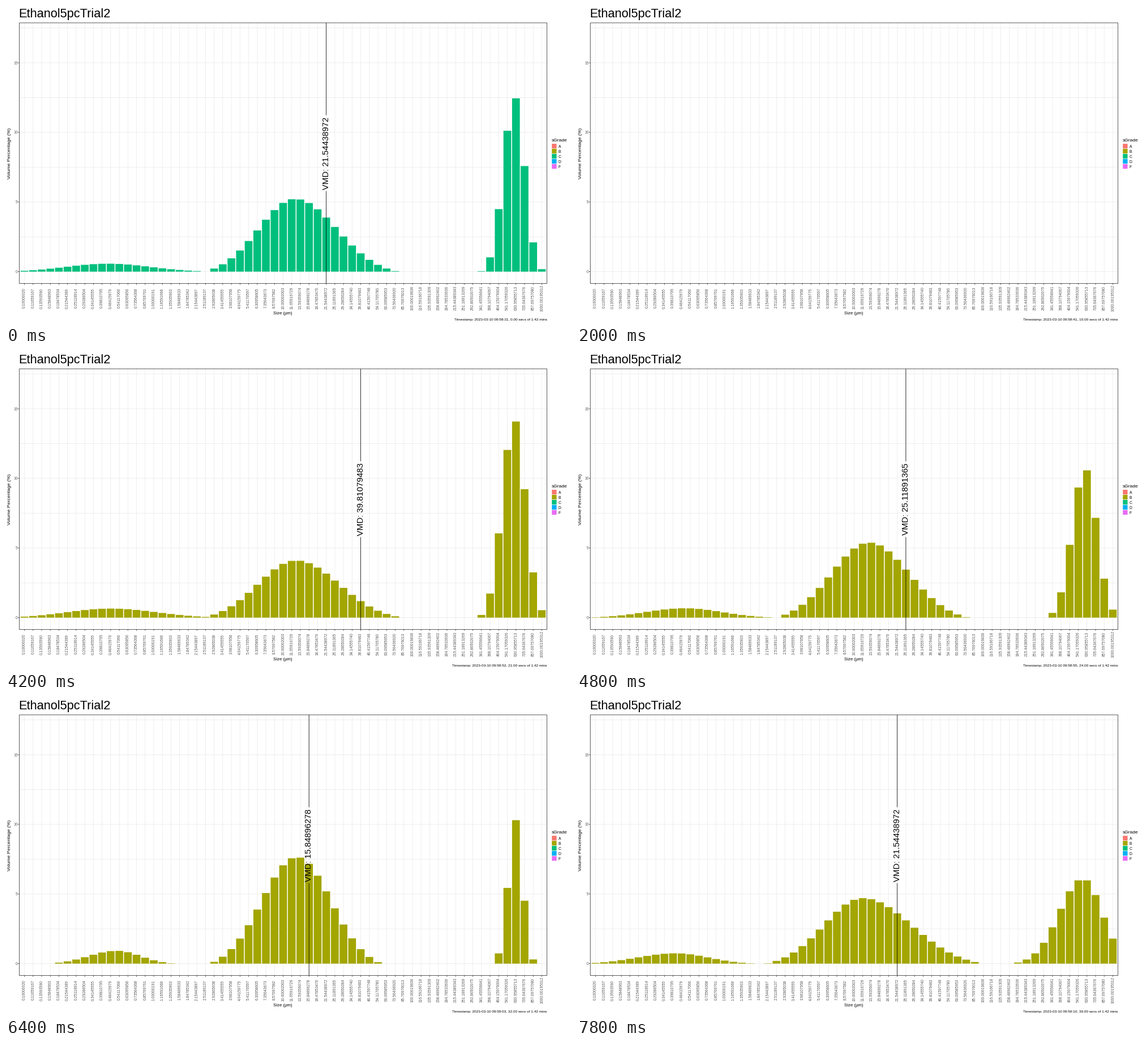
Write a matplotlib script that moves like this. It is 998x561 px and loops after 8000 ms.

```python
import numpy as np
import matplotlib.pyplot as plt
from matplotlib.animation import FuncAnimation
from matplotlib.patches import Rectangle

W, H, DPI = 998, 561, 100
FRAMES, INTERVAL = 40, 200
LEFT, RIGHT, TOP, BOTTOM = 23.4, 955.6, 29.8, 489.5
MID_Y = (TOP + BOTTOM) / 2
ZERO, UNIT = 468.6, 24.57
BINS = 61
STEP = (RIGHT - LEFT) / (BINS + 0.2)
BAR_W = 0.9 * STEP
THIN = 0.8
GRADES = {"A": "#F8766D", "B": "#A3A500", "C": "#00BF7D",
          "D": "#00B0F6", "F": "#E76BF3"}
EMPTY = range(9, 12)

plt.rcParams["font.family"] = "Liberation Sans"

# Second -> median bin, then a skewed bell for the fine, medium and coarse
# droplets: (peak, centre bin, left width, right width)
KEYS = {
    0: (35, (.57, 9.7, 7.0, 7.0), (5.22, 31.4, 6.03, 6.8), (12.55, 56.85, 1.84, 1.63)),
    5: (52, (.49, 10.3, 8.0, 7.0), (4.45, 31.2, 6.0, 5.9), (13.1, 56.9, 2.41, 1.95)),
    21: (39, (.65, 10, 7.3, 7.6), (4.1, 31.5, 6.25, 7.05), (14.25, 56.8, 1.96, 1.83)),
    28: (33, (.7, 10.9, 5.5, 4.25), (7.1, 32.05, 6.13, 5.95), (6.0, 56.75, 2.32, 2.08)),
    32: (33, (.92, 10.7, 4.6, 3.9), (7.65, 31.6, 5.78, 5.62), (10.3, 57, 1.26, 1.11)),
    39: (35, (.74, 9.3, 6.3, 5.4), (4.7, 31, 6.4, 8.0), (6.1, 56.55, 3.88, 3.15)),
}
TIMES = list(KEYS)
PARAMS = np.array([np.hstack(k) for k in KEYS.values()])
CUTS = (0.05, 0.05, 0.01)


def bin_x(i):
    return LEFT + (i + 0.6) * STEP


def value_y(v):
    return ZERO - v * UNIT


def bin_label(i):
    return f"{np.float32(0.100000196 * 10 ** (i / 15)):.8f}"


def bell(peak, centre, left, right, cut):
    """Skewed Gaussian over the bins, lowered so that its tails end."""
    d = np.arange(BINS) - centre
    g = np.exp(-(d / np.where(d < 0, left, right)) ** 2)
    return peak * ((1 + cut) * g - cut)


def sample(frame):
    """Median bin and bar heights at a given second."""
    p = [np.interp(frame, TIMES, column) for column in PARAMS.T]
    modes = [bell(*p[1 + 4 * k:5 + 4 * k], cut) for k, cut in enumerate(CUTS)]
    h = np.max(modes, axis=0)
    return int(round(p[0])), np.where(h > 0.02, h, 0)


fig = plt.figure(figsize=(W / DPI, H / DPI), dpi=DPI, facecolor="white")
ax = fig.add_axes([0, 0, 1, 1])
ax.set_xlim(0, W)
ax.set_ylim(H, 0)
ax.axis("off")


def px(size):
    return size * 72 / DPI


def text(x, y, s, size, color="black", ha="center", va="center", **kw):
    return ax.text(x, y, s, fontsize=px(size), color=color, ha=ha, va=va, **kw)


def line(xs, ys, color, z=1):
    return ax.plot(xs, ys, color=color, lw=px(THIN), zorder=z, snap=False,
                   solid_capstyle="butt")[0]


def box(x, y, w, h, color, z=3):
    return ax.add_patch(Rectangle((x, y), w, h, fc=color, lw=0, zorder=z, snap=False))


def draw_panel():
    for v in np.arange(0, 17.6, 2.5):
        y = value_y(v)
        line([LEFT, RIGHT], [y, y], "#EBEBEB")
        if v % 5 == 0:
            line([LEFT - 2.3, LEFT], [y, y], "#333333")
            text(LEFT - 2.6, y, f"{v:.0f}", 6.8, "#5A5A5A", ha="right",
                 va="center_baseline")
    for i in range(BINS):
        x = bin_x(i)
        line([x, x], [TOP, BOTTOM], "#EBEBEB")
        line([x, x], [BOTTOM, BOTTOM + 2.3], "#333333")
        text(x, 515.5, bin_label(i), 6.8, "#5A5A5A", rotation=90)
    ax.add_patch(Rectangle((LEFT, TOP), RIGHT - LEFT, BOTTOM - TOP, fill=False,
                           ec="#333333", lw=px(THIN), zorder=6, snap=False))
    text(LEFT - 0.8, 19.5, "Ethanol5pcTrial2", 21.8, ha="left", va="baseline")
    text(6.5, MID_Y, "Volume Percentage (%)", 8.5, rotation=90)
    text(489, 543, "Size (µm)", 7.8)


def draw_legend():
    text(964, 237.3, "sGrade", 8.5, ha="left")
    for k, (name, color) in enumerate(GRADES.items()):
        y = 247.2 + 8.95 * k
        box(964.2, y - 4.1, 8.3, 8.2, color)
        text(976, y + 0.2, name, 6.8, ha="left", va="center_baseline")


draw_panel()
draw_legend()
bars = [box(bin_x(i) - BAR_W / 2, ZERO, BAR_W, 0, "white") for i in range(BINS)]
marks = [line([], [], "black", 4) for _ in range(2)]
label = text(0, MID_Y, "", 14.86, rotation=90, zorder=5)
caption = text(RIGHT, 554, "", 6.5, ha="right")


def draw(frame):
    shown = frame not in EMPTY
    color = GRADES["C" if frame < 10 else "B"]
    median, heights = sample(frame)
    for bar, h in zip(bars, heights):
        bar.set_y(value_y(h))
        bar.set_height(h * UNIT)
        bar.set_facecolor(color)
        bar.set_visible(shown and h > 0)

    x, vmd = bin_x(median), f"VMD: {bin_label(median)}"
    gap = 67 + 4.13 * (len(vmd) - 16)
    label.set_text(vmd)
    label.set_x(x)
    marks[0].set_data([x, x], [TOP, MID_Y - gap])
    marks[1].set_data([x, x], [MID_Y + gap, BOTTOM])
    for part in (label, *marks):
        part.set_visible(shown)

    minute, second = divmod(58 * 60 + 31 + frame, 60)
    caption.set_text(f"Timestamp: 2023-03-10 09:{minute:02d}:{second:02d}, "
                     f"{frame:.2f} secs of 1.42 mins")
    return [*bars, *marks, label, caption]


anim = FuncAnimation(fig, draw, frames=FRAMES, interval=INTERVAL,
                     repeat=True, repeat_delay=0, blit=False)
plt.show()
```
